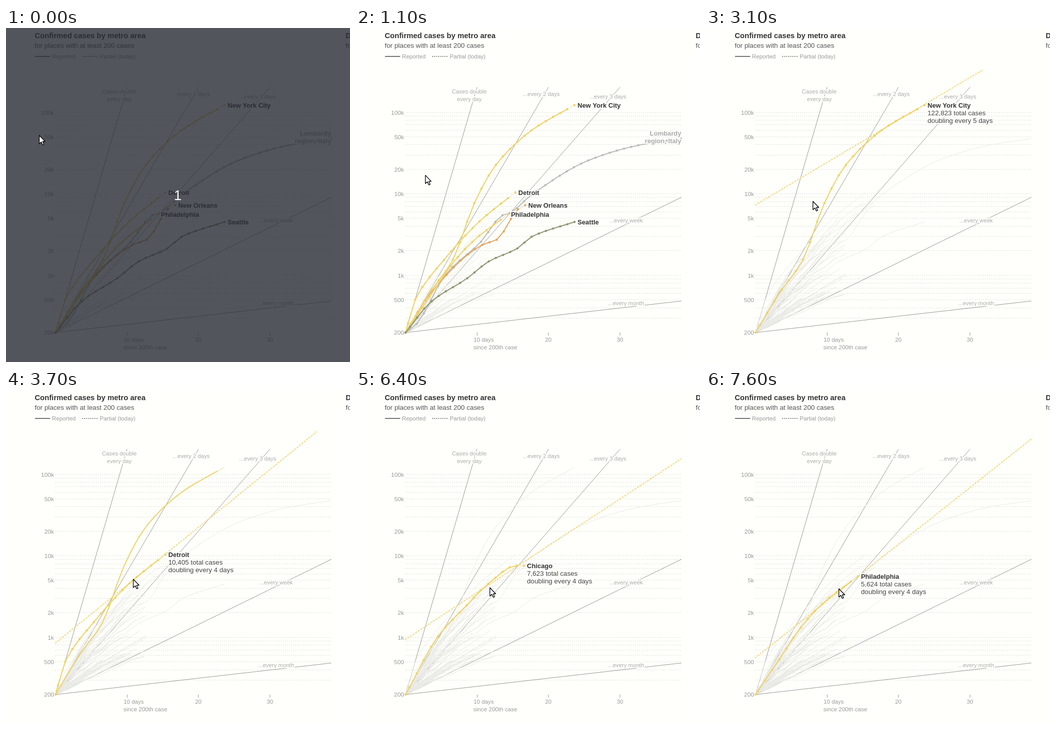
These frames come from a looping animation (677x658 px, 8 s). An HTML page with a canvas:

```html
<!DOCTYPE html>
<html lang="en">
<head>
<meta charset="utf-8">
<title>Confirmed cases by metro area</title>
<style>
  html, body { margin: 0; width: 100%; height: 100%; overflow: hidden; background: #fffffb; }
  canvas { display: block; }
</style>
</head>
<body>
<canvas id="stage" width="677" height="658"></canvas>
<script>
const ctx = document.getElementById('stage').getContext('2d');
const WIDTH = 677, HEIGHT = 658, LOOP = 8000;
const BG = '#fffffb', FAINT = '#e9e9e6', YELLOW = '#efd264', DARK = '#333';
const X0 = 97.5, Y0 = 600, DAY = 14.07, RIGHT = 640.5, TOP = 82;
const DECADE = 160.6, DOUBLING = DECADE * Math.log10(2);
const yOf = cases => Y0 - DECADE * Math.log10(cases / 200);
const clamp01 = v => Math.max(0, Math.min(1, v));

// `bends` are the turning points of a curve that leaves the origin.
// `trend` holds the height at the left edge and the days per doubling.
const cities = [
  { name: 'Chicago', color: YELLOW, hidden: true, total: '7,623', days: 4, trend: [492, 5.24],
    bends: [[161, 486], [218, 424], [260, 382], [316, 346], [330.5, 346]] },
  { name: 'Lombardy', color: '#bbb', region: true,
    bends: [[120, 582], [176, 486], [246, 421], [288, 369], [302, 365], [345, 329], [457, 261],
      [556, 231], [640, 218]] },
  { name: 'New Orleans', color: '#e8a45e',
    bends: [[150, 518], [249, 427], [277, 417], [319, 357], [333, 349]] },
  { name: 'Philadelphia', color: YELLOW, total: '5,624', days: 4, trend: [528, 4.33],
    bends: [[144, 531], [186, 469], [228, 422], [299, 367]] },
  { name: 'Detroit', color: YELLOW, total: '10,405', days: 4, trend: [499, 4.245],
    bends: [[116, 536], [173, 457], [243, 381], [313.5, 324]] },
  { name: 'New York City', color: YELLOW, total: '122,823', days: 5, trend: [349, 5.78],
    bends: [[148, 517], [190, 458], [233, 345], [275, 270], [345, 202], [430, 152]] },
  { name: 'Seattle', color: '#8c9670', complete: true,
    bends: [[148, 539], [219, 493], [261, 460], [318, 434], [346, 411], [430, 382]] }
];

// Monotone cubic through the knots.
function curve(knots) {
  const slopes = knots.slice(1).map(([x, y], i) => (y - knots[i][1]) / (x - knots[i][0]));
  const tangent = i => {
    const a = slopes[i - 1] ?? slopes[i], b = slopes[i] ?? a;
    return a * b > 0 ? 2 * a * b / (a + b) : 0;
  };
  return x => {
    let i = 0;
    while (i < slopes.length - 1 && x > knots[i + 1][0]) i++;
    const [xa, ya] = knots[i], [xb, yb] = knots[i + 1];
    const w = xb - xa, u = (x - xa) / w, v = 1 - u;
    return ya * v * v * (1 + 2 * u) + yb * u * u * (3 - 2 * u)
      + w * u * v * (tangent(i) * v - tangent(i + 1) * u);
  };
}

for (const city of cities) {
  const heightAt = curve([[X0, Y0], ...city.bends]);
  city.end = city.bends[city.bends.length - 1];
  city.points = [];
  for (let x = city.end[0]; x > X0 + 2; x -= DAY) city.points.unshift([x, heightAt(x)]);
  city.points.unshift([X0, Y0]);
}

let seed = 7;
const random = () => (seed = seed * 16807 % 2147483647) / 2147483647;
const minorCities = Array.from({ length: 60 }, () => {
  const rise = 7 + 16 * random() ** 1.4, days = 5 + Math.floor(9 * random());
  const points = [[X0, Y0]];
  let x = X0 + DAY * (0.2 + 0.6 * random()), y = Y0 - rise * 0.7;
  for (let i = 0; i < days; i++) {
    points.push([x, y]);
    x += DAY;
    y -= rise * (1 - 0.035 * i) * (0.55 + 0.9 * random());
  }
  return points;
});

const hovers = [[0, null], [1500, 'New York City'], [3700, 'Detroit'], [5300, 'Chicago'],
  [6500, 'Philadelphia'], [6600, 'Chicago'], [7300, 'Philadelphia']];
const moves = [
  { from: 500, to: 1600, x: 159, y: 315 },
  { from: 1700, to: 1800, x: 207, y: 338 },
  { from: 3000, to: 3100, x: 210, y: 341 },
  { from: 3100, to: 3800, x: 251, y: 373 },
  { from: 5050, to: 5400, x: 263, y: 389 },
  { from: 7200, to: 7600, x: 261, y: 391 }
];

function line(points, color, width = 1, dash = []) {
  ctx.beginPath();
  points.forEach(([x, y]) => ctx.lineTo(x, y));
  ctx.strokeStyle = color;
  ctx.lineWidth = width;
  ctx.setLineDash(dash);
  ctx.stroke();
  ctx.setLineDash([]);
}

function text(str, x, y, { size = 11.3, color = '#999', bold = false, align = 'left', halo = false } = {}) {
  ctx.font = `${bold ? 'bold ' : ''}${size}px "Liberation Sans", Arial, sans-serif`;
  ctx.textAlign = align;
  if (halo) {
    ctx.strokeStyle = BG;
    ctx.lineWidth = 4;
    ctx.strokeText(str, x, y);
  }
  ctx.fillStyle = color;
  ctx.fillText(str, x, y);
}

function drawHeader() {
  for (const [x, title] of [[56.5, 'Confirmed cases by metro area'], [668.5, 'Deaths by metro area']]) {
    text(title, x, 20, { size: 14.65, color: DARK, bold: true });
    text('for places with at least 200 cases', x, 39, { size: 13.3, color: '#555' });
  }
  line([[57, 56], [87, 56]], '#777', 2);
  text('Reported', 90.5, 60);
  line([[150, 56], [181, 56]], '#888', 2, [2, 2]);
  text('Partial (today)', 184.5, 60);
}

function drawAxes() {
  for (let base = 100; base <= 1e5; base *= 10) {
    for (let k = 1; k < 10; k++) {
      const cases = base * k, y = Math.round(yOf(cases)) - 0.5;
      if (cases >= 300 && cases <= 1e5) line([[97, y], [RIGHT, y]], '#dcdcd8', 1, [2, 2]);
      if (cases >= 200 && cases <= 1e5 && [1, 2, 5].includes(k))
        text(cases < 1e3 ? cases : cases / 1e3 + 'k', 94.5, yOf(cases) + 4, { size: 11.8, align: 'right' });
    }
  }
  for (const days of [10, 20, 30]) {
    const x = Math.floor(X0 + days * DAY) + 0.5;
    line([[x, 600], [x, 606]], '#999');
    if (days > 10) text(days, x, 618, { align: 'center' });
  }
  text('10 days', 231.5, 618);
  text('since 200th case', 231, 633, { size: 11.5 });
}

function drawDoublingGuides() {
  for (const days of [1, 2, 3, 7, 30]) {
    const x = Math.min(X0 + days * 10 * DAY, RIGHT);
    line([[X0, Y0], [x, Y0 - (x - X0) / DAY / days * DOUBLING]], '#999a94');
  }
  for (const [label, x, y] of [['Cases double', 223, 129], ['every day', 223, 144],
    ['...every 2 days', 364.5, 134], ['...every 3 days', 495.5, 139],
    ['...every week', 531.5, 383], ['...every month', 531.5, 546]])
    text(label, x, y, { size: 11.2, color: '#aaa', align: 'center', halo: true });
}

function drawTrend({ trend: [startY, pace] }) {
  const slope = DOUBLING / DAY / pace, startX = 96.5;
  const x = Math.min(RIGHT, startX + (startY - TOP) / slope);
  line([[startX, startY], [x, startY - (x - startX) * slope]], '#f1da82', 2, [4, 2]);
}

function drawSeries({ points, color, complete }, alpha, dots) {
  ctx.globalAlpha = alpha;
  line(complete ? points : points.slice(0, -1), color, 2);
  if (!complete) {
    ctx.globalAlpha = alpha * 0.5;
    line(points.slice(-2), color, 1.5, [2, 2]);
  }
  ctx.globalAlpha = 1;
  if (!dots) return;
  ctx.fillStyle = color;
  for (const [x, y] of points) {
    ctx.beginPath();
    ctx.arc(x, y, 2.2, 0, 7);
    ctx.fill();
  }
}

function drawLabel(city, detailed) {
  const bold = { size: 12.75, color: DARK, bold: true, halo: true };
  if (city.region) {
    const gray = { ...bold, color: '#aaa', align: 'right' };
    text(city.name, 640, 212, gray);
    text('region, Italy', 640, 227, gray);
    return;
  }
  const x = city.end[0] + 6, y = city.end[1] + 5;
  if (detailed) {
    const plain = { size: 13.2, color: '#444', halo: true };
    text(`${city.total} total cases`, x, y + 15, plain);
    text(`doubling every ${city.days} days`, x, y + 30, plain);
  }
  text(city.name, x, y, bold);
}

function drawChart(t) {
  const k = hovers.findLastIndex(([start]) => start <= t);
  const [since, name] = hovers[k], before = k ? hovers[k - 1][1] : null;
  const fade = k ? clamp01((t - since) / 300) ** 2 : 1;
  const isLit = (city, hover) => hover ? city.name === hover : !city.hidden;
  const lit = cities.filter(c => isLit(c, name));
  const fading = cities.filter(c => !isLit(c, name) && isLit(c, before));

  const strength = hover => hover ? 1 : 0.5;
  ctx.globalAlpha = strength(before) + (strength(name) - strength(before)) * fade;
  for (const points of minorCities) line(points, FAINT);
  for (const c of cities) line(c.points, FAINT);

  for (const c of fading) drawSeries(c, 1 - fade, false);
  ctx.globalAlpha = 1;
  if (name) drawTrend(lit[0]);
  for (const c of lit) drawSeries(c, 1, true);
  for (const c of lit) drawLabel(c, name);
}

function drawCountdown() {
  ctx.fillStyle = 'rgba(39,43,52,0.8)';
  ctx.fillRect(0, 0, WIDTH, HEIGHT);
  text('1', 338, 339, { size: 27, color: '#fff', align: 'center' });
}

function drawPointer(t) {
  let x = 65, y = 211;
  for (const m of moves) {
    const p = Math.sin(clamp01((t - m.from) / (m.to - m.from)) * Math.PI / 2);
    x += (m.x - x) * p;
    y += (m.y - y) * p;
  }
  ctx.save();
  ctx.translate(x + 0.5, y + 0.5);
  ctx.beginPath();
  for (const [px, py] of [[0, 0], [0, 16.5], [4, 13], [6.7, 19], [9.3, 18], [6.7, 12], [11.5, 12]])
    ctx.lineTo(px, py);
  ctx.closePath();
  ctx.fillStyle = '#fff';
  ctx.fill();
  ctx.strokeStyle = '#000';
  ctx.lineWidth = 1.3;
  ctx.stroke();
  ctx.restore();
}

function frame() {
  // The picture advances in steps of 100 ms.
  const t = Math.floor(performance.now() % LOOP / 100) * 100;
  ctx.lineJoin = 'round';
  ctx.fillStyle = BG;
  ctx.fillRect(0, 0, WIDTH, HEIGHT);
  drawHeader();
  drawAxes();
  drawDoublingGuides();
  drawChart(t);
  if (t < 200) drawCountdown();
  drawPointer(t);
  requestAnimationFrame(frame);
}
frame();
</script>
</body>
</html>
```
